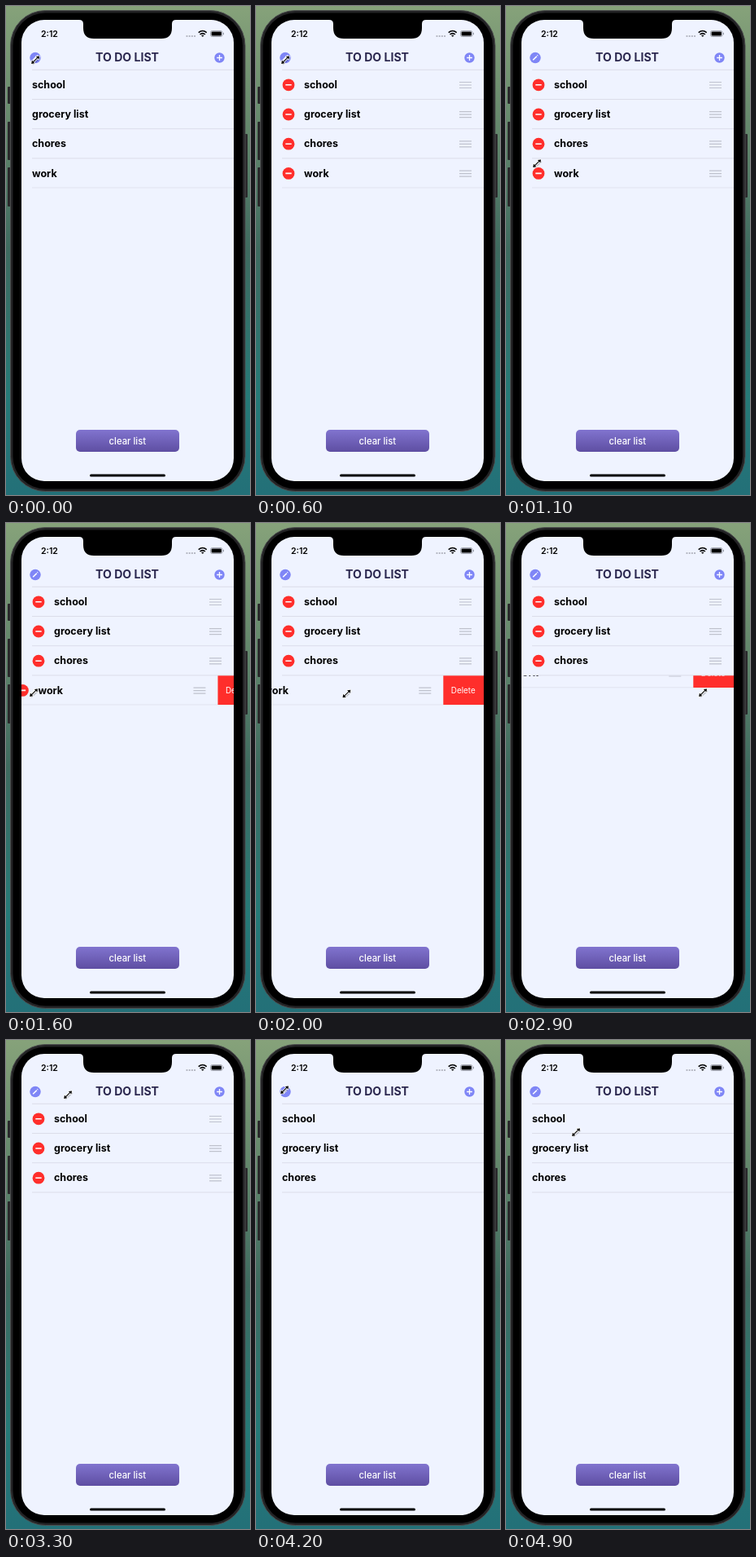
These frames come from a looping animation (300x600 px, 5 s). An HTML page:

```html
<!DOCTYPE html>
<html lang="en">
<head>
<meta charset="utf-8">
<title>To do list</title>
<style>
html, body { margin: 0; width: 100%; height: 100%; overflow: hidden; }
svg { display: block; width: 300px; height: 600px; }
text { font-family: Inter, "Open Sans", sans-serif; }
.label { font-size: 12.5px; font-weight: 700; }
.rule { stroke: #d6d9e4; stroke-width: .8; }
.grip { stroke: #bfc2cd; stroke-width: 1.2; }
</style>
</head>
<body>
<svg viewBox="0 0 300 600">
  <defs>
    <linearGradient id="wall" x2="0" y2="1">
      <stop stop-color="#86a27a"/><stop offset=".25" stop-color="#64886c"/>
      <stop offset=".5" stop-color="#3f6b60"/><stop offset=".8" stop-color="#267a78"/>
      <stop offset="1" stop-color="#237078"/>
    </linearGradient>
    <linearGradient id="violet" x2="0" y2="1">
      <stop stop-color="#8174cf"/><stop offset="1" stop-color="#5e4ea2"/>
    </linearGradient>
    <clipPath id="screen"><rect x="19" y="17" width="261" height="566" rx="28"/></clipPath>
    <clipPath id="slot"><rect id="slotBox" x="19" y="187.3" width="261" height="36.3"/></clipPath>
  </defs>

  <rect width="300" height="600" fill="url(#wall)"/>
  <g fill="#29292b">
    <rect x="2" y="99" width="5" height="21" rx="1"/>
    <rect x="2" y="142" width="5" height="47" rx="1"/>
    <rect x="2" y="198" width="5" height="48" rx="1"/>
    <rect x="293" y="157" width="4" height="78" rx="1"/>
  </g>
  <rect x="5.5" y="5.5" width="288.5" height="590" rx="43" fill="#232325" stroke="#4c4d4e"/>
  <rect x="8.5" y="8.5" width="282.5" height="584" rx="40"/>

  <g clip-path="url(#screen)">
    <rect x="19" y="17" width="261" height="566" fill="#eff3ff"/>
    <path d="M90 17q5 0 5 5v5q0 13 13 13h83q13 0 13-13v-5q0-5 5-5z"/>
    <text x="43" y="38" font-size="10.5" font-weight="600">2:12</text>
    <path d="M221.5 37h12" stroke="#b4b7c2" stroke-width="1.8" stroke-dasharray="1.9 1.3"/>
    <g fill="none" stroke="#000" stroke-width="1.6">
      <path d="M236.7 32.6q5-4.2 10 0M238.5 34.9q3.2-2.6 6.4 0"/>
      <path d="M240.6 36.2h2.4l-1.2 1.3z" fill="#000" stroke-width=".8"/>
    </g>
    <rect x="251.5" y="30.5" width="14.5" height="7" rx="2" fill="none" stroke="#8d909b" stroke-width=".8"/>
    <rect x="252.6" y="31.6" width="12.3" height="4.8" rx="1"/>
    <path d="M267.3 32.8v2.4" stroke="#8d909b"/>

    <text x="149" y="67.8" font-size="14.1" font-weight="700" text-anchor="middle" fill="#2c284f">TO DO LIST</text>
    <circle cx="36" cy="63.5" r="6.7" fill="#7f86f6"/>
    <path d="M33.2 66.3l4.6-4.6M38.5 61l.6-.6" stroke="#fff" stroke-width="1.6"/>
    <circle cx="262.5" cy="63.5" r="6.2" fill="#7f86f6"/>
    <path d="M259.1 63.5h6.8M262.5 60.1v6.8" stroke="#fff" stroke-width="1.3"/>
    <path class="rule" d="M32 78.3h248"/>
    <g id="rows"></g>

    <rect x="86" y="520" width="127" height="27" rx="5" fill="url(#violet)"/>
    <text x="149.3" y="537.6" font-size="11.3" font-weight="500" text-anchor="middle" fill="#fff">clear list</text>
    <rect x="103" y="574.5" width="93" height="3" rx="1.5"/>
  </g>

  <g id="cursor" stroke-linejoin="round">
    <path d="M-4 5L5-3" stroke="#000" stroke-opacity=".2" stroke-width="4"/>
    <path id="arrow" d="M5-4.6L.8-4.1 2.2-2.7-2.7 2.1-4.1.7-4.8 4.9-.6 4.3-2 2.9 2.9-1.9 4.4-.5z" stroke="#fff" stroke-width="1.5" paint-order="stroke"/>
  </g>
</svg>

<script>
const $ = id => document.getElementById(id);
const LOOP = 5000, STEP = 100, ROW = 36.2;

$("rows").innerHTML = ["school", "grocery list", "chores", "work"].map((name, i) => {
  const y = 96.5 + ROW * i, last = i === 3;
  return `<g ${last ? 'clip-path="url(#slot)"' : ""}><g ${last ? 'id="swiped"' : ""}>
    <path class="rule" d="M32 ${y + 18}h248"/>
    <g class="minus">
      <circle cx="40" cy="${y + .3}" r="7.4" fill="#ff2e2b"/>
      <path d="M36.3 ${y + .3}h7.4" stroke="#fff" stroke-width="1.6"/>
    </g>
    <text class="label" y="${y + 4.5}">${name}</text>
    <path class="grip" d="M250 ${y - 3}h15m-15 3.5h15m-15 3.5h15"/>
    ${last ? `<rect x="280" y="${y - 18}" width="52" height="36" fill="#ff2e2b"/>
      <text x="289.5" y="${y + 3.7}" font-size="9.9" fill="#fff">Delete</text>` : ""}
  </g></g>`;
}).join("");

const each = (sel, fn) => document.querySelectorAll(sel).forEach(fn);
const ease = (t, from, to) => {
  const p = Math.min(1, Math.max(0, (t - from) / (to - from)));
  return p * p * (3 - 2 * p);
};

// Pointer path: time, x, y
const path = [
  [0, 36, 66], [600, 36, 66], [800, 40, 105], [1000, 42, 178], [1200, 34, 208],
  [1800, 34, 208], [2100, 150, 210], [2400, 242, 208], [2900, 242, 208],
  [3100, 190, 196], [3200, 122, 112], [3300, 76, 67], [3600, 35, 61],
  [4300, 35, 61], [4500, 38, 63], [4600, 38, 63], [4900, 86, 113], [5000, 86, 113]
];

function pointer(t) {
  const i = path.findIndex(p => p[0] > t);
  const [t0, x0, y0] = path[i - 1], [t1, x1, y1] = path[i];
  const p = (t - t0) / (t1 - t0);
  return [x0 + (x1 - x0) * p, y0 + (y1 - y0) * p];
}

function draw(t) {
  const edit = ease(t, 0, 450) - ease(t, 3700, 4150);
  const swipe = 49.7 * ease(t, 1450, 1800);
  const gone = ease(t, 2650, 3100);

  each(".minus", el => {
    el.setAttribute("transform", `translate(${27 * (edit - 1)})`);
    el.setAttribute("opacity", edit);
  });
  each(".label", el => el.setAttribute("x", 32 + 27 * edit));
  each(".grip", el => {
    el.setAttribute("transform", `translate(${20 * (1 - edit)})`);
    el.setAttribute("opacity", edit);
  });
  $("swiped").setAttribute("transform", `translate(${-swipe} ${-ROW * gone})`);
  $("swiped").setAttribute("visibility", gone < 1 ? "visible" : "hidden");
  $("slotBox").setAttribute("height", 36.3 * (1 - gone));
  $("cursor").setAttribute("transform", `translate(${pointer(t)})`);
}

const start = performance.now();
function tick() {
  const t = (performance.now() - start) % LOOP;
  draw(Math.floor(t / STEP) * STEP);
  requestAnimationFrame(tick);
}
tick();
</script>
</body>
</html>
```
